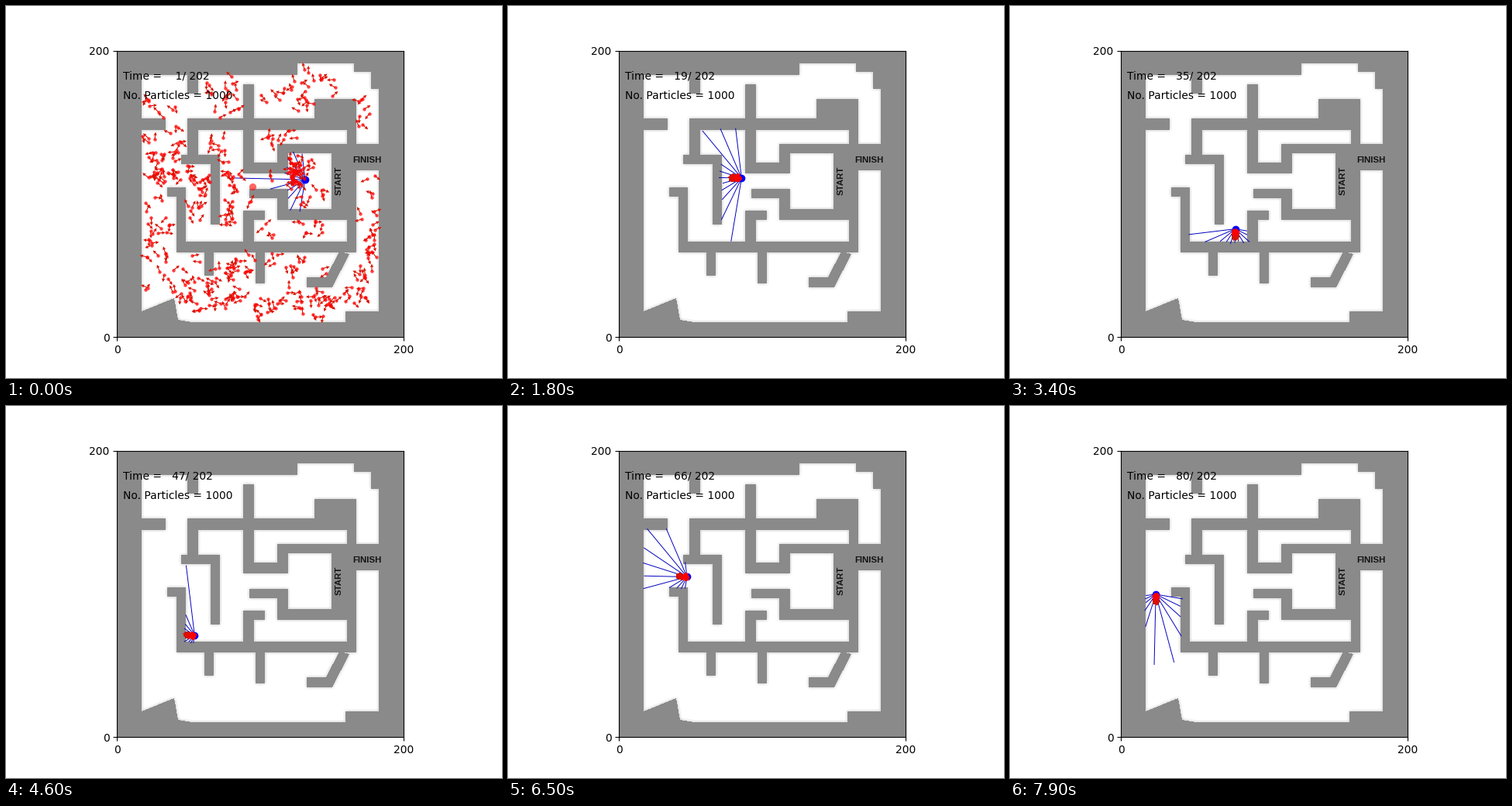
Animation of 640x480 px, one loop 8 s. Source, as a matplotlib script:

```python
import numpy as np
import matplotlib.pyplot as plt
from matplotlib.animation import FuncAnimation
from matplotlib.collections import LineCollection
from matplotlib.path import Path

W, H, DPI = 640, 480, 100
FRAMES, STEP, REACH, COUNT = 80, 4.7, 91, 440
L, R, T, B = 143.2, 512.8, 57.6, 427.2  # maze box in stage pixels
HALF = 6.5                              # half a wall's thickness
LEGS = "L20 D16 L10 U16 L12 D5"         # robot route: direction and steps
LEAN = np.radians(1.3)                  # constant heading error
WALL, RIM = 0.54, 0.88


def elbows(x, y, *turns):
    """Corners of a path that runs across, then down, then across..."""
    pts = [(x, y)]
    for i, v in enumerate(turns):
        x, y = (x, v) if i % 2 else (v, y)
        pts.append((x, y))
    return pts


def inside(points):
    ys, xs = np.mgrid[0:H, 0:W] + 0.5
    cells = np.column_stack([xs.ravel(), ys.ravel()])
    return Path(points).contains_points(cells).reshape(H, W)


def build_walls():
    floor = elbows(175, 90, 376, 75, 449, 86, 471, 108, 481, 394, 438, 408, 240)
    grid = ~inside(floor + [(222, 405), (217, 377), (175, 394)])
    grid |= inside([(430, 317), (443, 320), (421, 363),
                    (388, 363), (388, 350), (413, 350)])

    def block(x0, y0, x1, y1):
        grid[round(y0):round(y1), round(x0):round(x1)] = True

    def wall(*path):
        pts = elbows(*path)
        for a, b in zip(pts, pts[1:]):
            block(*np.minimum(a, b) - HALF, *np.maximum(a, b) + HALF)

    wall(175, 153, 200)
    wall(241, 90, 241, 107)
    wall(313, 109, 313, 209, 357, 184, 506)
    wall(320, 242, 357, 269, 446, 311, 226, 240, 215)
    wall(233, 198, 270, 276)
    wall(241, 198, 241, 153, 446, 184)
    wall(327, 270, 313, 311)
    wall(262, 311, 262, 342)
    wall(328, 311, 328, 351)
    block(398, 121, 452, 160)
    block(420, 178, 452, 276)
    block(452, 178, 513, 212)
    return grid


def nearness(r):
    """Share of wall in the square of radius r around each pixel."""
    span = range(-r, r + 1)
    return np.mean([np.roll(walls, (dy, dx), (0, 1)) for dy in span for dx in span],
                   axis=0)


def unit(a):
    return np.stack([np.cos(a), np.sin(a)], axis=-1)


def plan():
    quarter = {c: i * np.pi / 2 + LEAN for i, c in enumerate("RDLU")}
    turns = [quarter[leg[0]] for leg in LEGS.split() for _ in range(int(leg[1:]))]
    moves = np.vstack([[(386, 224)], unit(np.array(turns)) * STEP])
    return moves.cumsum(axis=0), [turns[0]] + turns


def blocked(p):
    x = np.clip(p[..., 0].astype(int), 0, W - 1)
    y = np.clip(p[..., 1].astype(int), 0, H - 1)
    return walls[y, x]


def scan(pos, head, rng):
    dirs = unit(head + np.arange(-5, 6) * np.pi / 11)
    dist = np.arange(1, REACH + 1)
    hit = blocked(pos + dirs[:, None] * dist[:, None])
    size = np.where(hit.any(axis=1), hit.argmax(axis=1) + rng.normal(2, 1.5, 11), REACH)
    return [(pos, end) for end in pos + dirs * np.maximum(size, 3)[:, None]]


def scatter_particles():
    rng = np.random.default_rng(7)
    free = np.argwhere(nearness(5) == 0)[:, ::-1]
    start = np.repeat(rng.permutation(free)[:COUNT // 2], 2, axis=0).astype(float)
    shift = start + rng.normal(0, 5, start.shape)
    start = np.where(blocked(shift)[:, None], start, shift)
    start[:28] = rng.normal((373, 216), (5, 8), (28, 2))
    angle = rng.uniform(0, 2 * np.pi, COUNT)
    leave = np.minimum(rng.geometric(0.6, COUNT), 5)
    # two stragglers in the right-hand corridor
    start[-2:] = np.array([(468, 290), (472, 314)]) + (0, 6 * STEP)
    angle[-2:], leave[-2:] = -np.pi / 2, 9
    return start, angle, leave


walls = build_walls()
spots, heads = plan()
start, angle, leave = scatter_particles()
shade = np.where(walls, WALL, 1 - (1 - RIM) * np.clip(nearness(3) * 2, 0, 1))

fig = plt.figure(figsize=(W / DPI, H / DPI), dpi=DPI, facecolor="white")
ax = fig.add_axes([L / W, 1 - B / H, (R - L) / W, (B - T) / H])
ax.imshow(shade[57:428, 143:514], extent=(143, 514, 428, 57), cmap="gray",
          vmin=0, vmax=1, interpolation="nearest", aspect="auto")
ax.set(xlim=(L, R), ylim=(B, T))
ax.set_xticks([L, R], ["0", "200"])
ax.set_yticks([B, T], ["0", "200"])

sign = dict(family="Liberation Sans", weight="bold", size=8.2, color="#141414",
            ha="center", va="center")
ax.text(466, 199.5, "FINISH", **sign)
ax.text(430, 225, "START", rotation=90, **sign)
clock = ax.text(150.6, 94.6, "", zorder=8)
ax.text(150.6, 119.6, "No. Particles = 1000", zorder=8)

rays = ax.add_collection(LineCollection([], colors="#0000c0", linewidths=0.7, zorder=2))
robot, = ax.plot([], [], "o", color="blue", ms=7, mew=0, zorder=3)
arrows = ax.quiver(start[:, 0], start[:, 1], np.ones(COUNT), np.ones(COUNT),
                   angles="xy", scale_units="xy", scale=1, units="dots", width=1.1,
                   headwidth=4, headlength=4, headaxislength=3.5,
                   color="#d81000", zorder=4)
dots = ax.scatter(start[:, 0], start[:, 1], s=10, color=(1, 0, 0, 0.75),
                  linewidths=0, zorder=5)
guess, = ax.plot([], [], "o", color="red", alpha=0.6, ms=6.6, mew=0, zorder=6)


def draw(k):
    rng = np.random.default_rng(100 + k)
    pos, head = spots[k], heads[k]
    lead = 1.5 + 7 * np.exp(-k / 30)
    mean = pos + unit(head) * lead + np.array([-60, 9]) * np.exp(-k / 1.2)

    pts = start + unit(angle) * STEP * k
    turn = angle.copy()
    found = (k >= leave) | (blocked(pts) & (k > 0))
    pick = np.arange(COUNT)[found] % 40
    pts[found] = mean + rng.normal(0, 1.1, (40, 2))[pick]
    turn[found] = rng.normal(head, 0.15, 40)[pick]

    arrows.set_offsets(pts)
    arrows.XY = pts
    arrows.set_UVC(*(unit(turn) * 9.5).T)
    dots.set_offsets(pts)
    rays.set_segments(scan(pos, head, rng))
    robot.set_data([pos[0]], [pos[1]])
    guess.set_data([mean[0]], [mean[1]])
    clock.set_text(f"Time = {k + 1:4d}/ 202")
    return arrows, dots, rays, robot, guess, clock


anim = FuncAnimation(fig, draw, frames=FRAMES, interval=100, repeat=True)
plt.show()
```
